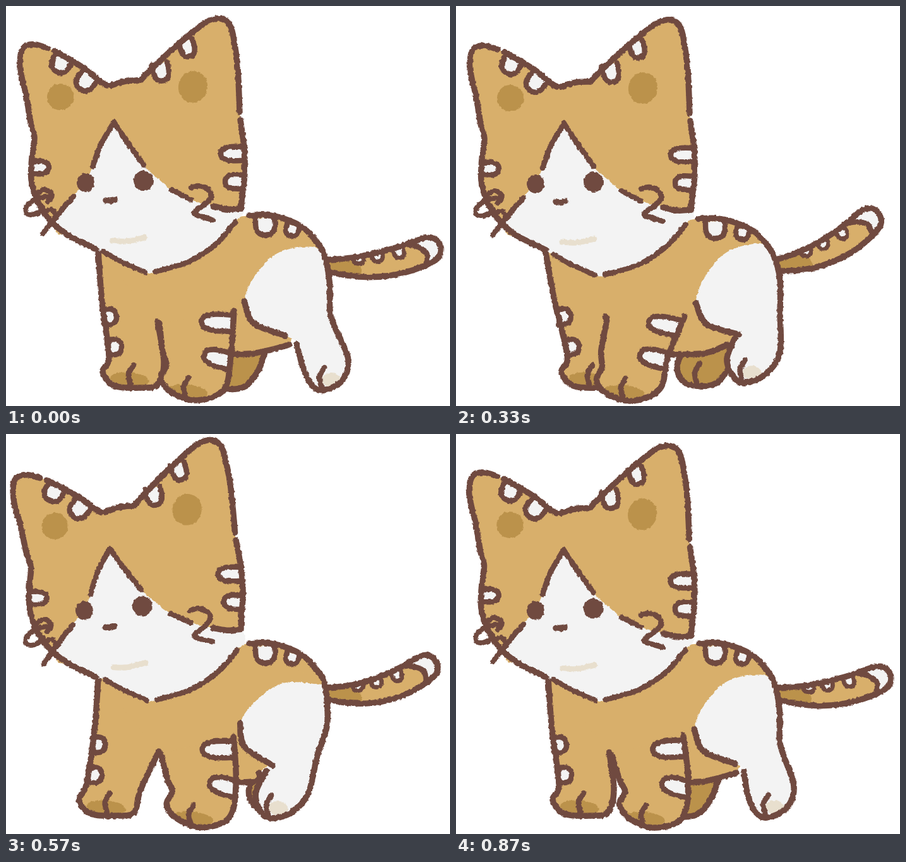
An HTML page with a canvas that plays this animation: 703 px wide and 634 px high, repeating every 0.9 s.

```html
<!DOCTYPE html>
<html lang="en">
<head>
<meta charset="utf-8">
<title>Walking cat</title>
<style>
  html, body { margin: 0; width: 100%; height: 100%; overflow: hidden; background: #fff; }
  canvas { display: block; width: 703px; height: 634px; filter: url(#rough); }
  svg { position: absolute; width: 0; height: 0; }
</style>
</head>
<body>
<canvas id="stage" width="703" height="634"></canvas>
<svg aria-hidden="true">
  <filter id="rough" x="0" y="0" width="100%" height="100%" color-interpolation-filters="sRGB">
    <feTurbulence type="fractalNoise" baseFrequency="0.2" numOctaves="2" seed="4"/>
    <feDisplacementMap in="SourceGraphic" scale="4" xChannelSelector="R" yChannelSelector="G"/>
  </filter>
</svg>
<script>
const ctx = document.getElementById('stage').getContext('2d');
const LINE = '#704a40', TAN = '#d8af6b', DARK = '#bb924b', WHITE = '#f3f3f3', PALE = '#e8dfce';
const LOOP = 900, STEP = 30, DEG = Math.PI / 180;

// Key values of the walk at these times; the rest follows from them
const TIMES = [0, 120, 210, 330, 480, 690, 870];
const WALK = {
  tilt:  [0, .033, .045, 0, -.047, -.035, -.004],
  nod:   [0, .6, 2.2, 2, -.2, -3.6, -.4],
  bob:   [0, 4, 6, 4.5, 2, -2, 0],
  nearX: [0, -36, -46, -22, -1, 18, 13],
  nearY: [0, -6, -9, 1, 0, -3, -1],
  leftX: [0, 16, 27, 14, -38, -23, 0],
  farX:  [-3, 3, 8, 30, 70, 43, 2],
  hindX: [3, 0, -12, -40, -80, -53, -6],
  hindY: [10, 0, -4, -1, 12, 9, 9],
  thigh: [.17, 0, 0, .1, .4, .27, .17]
};

// Smooth periodic curve through the key values
function ease(v, t) {
  const n = TIMES.length;
  const time = i => TIMES[(i + n) % n] + LOOP * Math.floor(i / n);
  const val = i => v[(i + n) % n];
  let i = n - 1;
  while (TIMES[i] > t) i--;
  const h = time(i + 1) - time(i), u = (t - time(i)) / h;
  const slope = k => (val(k + 1) - val(k - 1)) / (time(k + 1) - time(k - 1)) * h;
  return val(i) + (val(i + 1) - val(i)) * u * u * (3 - 2 * u)
    + slope(i) * u * (1 - u) ** 2 - slope(i + 1) * u * u * (1 - u);
}

function pts(...a) {
  const out = [];
  for (let i = 0; i < a.length; i += 2) out.push([a[i], a[i + 1]]);
  return out;
}
const clamp = v => Math.max(0, Math.min(1, v));
const mix = (a, b, w) => a + (b - a) * w;
const move = (p, x, y) => p.map(q => [q[0] + x, q[1] + y]);
const flip = p => p.slice().reverse();
function spin(p, [cx, cy], a) {
  const c = Math.cos(a), s = Math.sin(a);
  return p.map(([x, y]) => [cx + (x - cx) * c - (y - cy) * s, cy + (x - cx) * s + (y - cy) * c]);
}

// Bends a leg: its top turns about the hip, its paw shifts and rolls
function skin(p, { hip, paw, top, low }, x, y, swing, roll) {
  const upper = spin(p, hip, swing), lower = move(spin(p, paw, roll), x, y);
  return p.map((q, i) => {
    const w = clamp((q[1] - top) / (low - top)) ** 1.5;
    return [mix(upper[i][0], lower[i][0], w), mix(upper[i][1], lower[i][1], w)];
  });
}

function curve(p) {
  const at = i => p[Math.max(0, Math.min(p.length - 1, i))];
  ctx.beginPath();
  ctx.moveTo(...p[0]);
  for (let i = 0; i < p.length - 1; i++) {
    const [a, b, c, d] = [at(i - 1), at(i), at(i + 1), at(i + 2)];
    ctx.bezierCurveTo(b[0] + (c[0] - a[0]) / 6, b[1] + (c[1] - a[1]) / 6,
      c[0] - (d[0] - b[0]) / 6, c[1] - (d[1] - b[1]) / 6, c[0], c[1]);
  }
}
function fill(p, color) {
  curve(p);
  ctx.fillStyle = color;
  ctx.fill();
}
function stroke(p, width = 9.5, color = LINE) {
  curve(p);
  ctx.lineWidth = width;
  ctx.strokeStyle = color;
  ctx.stroke();
}
function oval([x, y], rx, ry, color, turn = 0) {
  ctx.beginPath();
  ctx.ellipse(x, y, rx, ry, turn, 0, 7);
  ctx.fillStyle = color;
  ctx.fill();
}
function shade(shape, [x, y], rx, ry, color) {
  ctx.save();
  curve(shape);
  ctx.clip();
  oval([x, y], rx, ry, color, .1);
  ctx.restore();
}
// White U-shaped stripe growing from a root point
function bar([x, y], angle, len, half, width = 8.5) {
  const u = [[0, -1], [.55, -1], [.9, -.65], [1, 0], [.9, .65], [.55, 1], [0, 1]];
  const p = spin(move(u.map(q => [q[0] * len, q[1] * half]), x, y), [x, y], angle * DEG);
  fill(p, WHITE);
  stroke(p, width);
}
const toe = ([x, y], dx) =>
  stroke([[x + dx, y - 36], [x + dx - 8, y - 21], [x + dx - 5, y - 6]], 8.5);

function drawTail(t) {
  const lag = deg => (.5 + .5 * Math.cos(t / LOOP * 2 * Math.PI - deg * DEG)) ** 1.5;
  const base = -16 * lag(115), tip = -18 * lag(140);
  const heading = u => 10 - 36 * u + base + 2 * (tip - base) * u;
  const half = u => 9 + 12 * Math.sin(2 * u);
  // point at u along the tail, side -1 (upper edge) to 1 (lower edge)
  const at = (u, side, reach = 0) => {
    let x = 508, y = 411;
    for (let i = 0; i < 20; i++) {
      const a = heading(u * (i + .5) / 20) * DEG;
      x += 165 * u / 20 * Math.cos(a);
      y += 165 * u / 20 * Math.sin(a);
    }
    const a = heading(u) * DEG, h = half(u);
    return [x + h * (reach * Math.cos(a) - side * Math.sin(a)), y + h * (reach * Math.sin(a) + side * Math.cos(a))];
  };
  const upper = [0, .2, .4, .6, .8, 1].map(u => at(u, -1)), lower = [1, .8, .6, .4, .2, 0].map(u => at(u, 1));
  const cap = [-45, 0, 45].map(d => at(1, Math.sin(d * DEG), Math.cos(d * DEG)));
  const edge = [...upper, ...cap, ...lower];
  const ring = [at(.82, -1), at(.92, -.5), at(.97, .2), at(.93, 1)];

  fill(edge, TAN);
  fill([at(0, -1), at(.27, -.9), at(.32, 0), at(.3, 1), at(0, 1)], DARK);
  fill([ring[0], at(1, -1), ...cap, at(1, 1), ...flip(ring)], WHITE);
  for (const u of [.31, .5, .72]) bar(at(u, -1), heading(u) + 90, 6 + 16 * u, 8, 7);
  stroke(ring, 8.5);
  stroke(edge);
}

const NEAR = { hip: [302, 493], paw: [300, 600], top: 483, low: 575 };
const LEFT = { hip: [195, 440], paw: [200, 590], top: 390, low: 560 };
const HIND = { hip: [418, 431], paw: [505, 570], top: 440, low: 565 };

function drawBody(t, w) {
  const lift = p => p.map(([x, y]) => [x, y + 1.2 * w.bob * clamp((540 - x) / 60)]);
  const back = lift(pts(384,332, 410,331, 440,337, 470,351, 492,374, 505,397));
  const bendNear = p => skin(p, NEAR, w.nearX, w.nearY, -w.nearX / 140, w.nearX * .003);
  const bendLeft = p => skin(p, LEFT, w.leftX, 0, 0, 0);

  const far = move(pts(330,550, 320,575, 328,598, 352,607, 382,602, 402,578, 414,546), w.farX, -.15 * w.farX);
  const near = bendNear(pts(243,503, 248,548, 254,569, 245,590, 262,612, 302,625, 345,608, 356,555, 361,483));
  const left = bendLeft(pts(152,470, 163,555, 153,580, 172,602, 213,605, 240,600, 250,565));
  left.unshift([146 - w.bob, 388]);
  left.push([near[0][0] - 3, near[0][1] - 3]);
  const thigh = spin(pts(476,371, 425,389, 395,430, 384,474, 404,506, 457,517), HIND.hip, w.thigh);
  const foot = skin(pts(466,527, 468,565, 482,592, 500,599, 530,583, 544,545, 522,477, 513,425),
    HIND, w.hindX, w.hindY, w.thigh, -.003 * w.hindX);

  fill(far, DARK);
  stroke(far);
  toe(far[3], 4);

  const belly = [[335, 553], [395, 550], [foot[0][0] - 12, 537]];
  ctx.beginPath();
  for (const p of [left[0], [250, 350], ...back, [480, 470], ...flip(belly), near[0], left[8], left[1]]) ctx.lineTo(...p);
  ctx.fillStyle = TAN;
  ctx.fill();
  fill(back, TAN);
  stroke(belly);

  fill(left, TAN);
  shade(left, [left[5][0] - 17, left[5][1] - 13], 31, 11, DARK);
  for (const p of bendLeft(pts(155,493, 163,541))) bar(p, -3, 20, 12);
  toe(left[5], -11);
  stroke(left);

  const hind = [back[5], ...thigh, ...foot];
  fill(hind, WHITE);
  shade(hind, [foot[3][0] + 12, foot[3][1] - 16], 15, 11, PALE);
  toe(foot[3], 1);
  stroke(thigh.slice(3));
  const [spotA, spotB] = lift(pts(410,336, 455,348));
  bar(spotA, 87, 27, 15);
  bar(spotB, 105, 17, 10);
  stroke([...back, ...flip(foot)]);

  fill(near, TAN);
  shade(near, [near[5][0] - 15, near[5][1] - 14], 32, 11, DARK);
  const [barA, barB] = bendNear(pts(358,503, 356,564));
  bar(barA, 183 - .4 * w.nearX, 49, 13);
  bar(barB, 195, 44, 13);
  toe(near[5], -13);
  stroke(near);
}

function drawHead(w) {
  const tip = p => p.map(([x, y]) => [x - w.tilt * (y - 325), y + w.tilt * (x - 165) + w.nod]);
  const line = (...a) => tip(pts(...a));
  const hang = p => move(p, -60 * w.tilt, w.bob);

  const cheek = line(66,67, 46,61, 30,64, 23,78, 24,108, 32,142, 39,185, 45,208, 41,240, 40,275, 48,305, 61,328, 75,345, 98,363);
  const crown = line(77,71, 105,87, 130,103, 150,120, 160,126);
  const brow = line(166,126, 190,119, 213,118);
  const ear = line(213,118, 225,105, 260,72, 300,38, 320,24, 340,20, 355,31, 362,60, 367,100, 370,168);
  const side = line(371,180, 377,225, 378,265, 374,300, 372,321);
  const jaw = line(328,317, 350,322, 372,321);
  const right = line(171,184, 171,184, 190,213, 218,252, 240,273, 262,291, 293,307);
  const leftMask = line(75,345, 106,302, 125,280, 137,255, 150,220, 171,184, 171,184);
  const neck = hang(pts(376,329, 363,342, 335,375, 290,405, 228,424, 186,407, 150,388));
  const chin = [[142, 385 + w.bob / 3]];

  fill([...cheek, ...line(230,340), ...jaw, ...flip([...crown, ...brow, ...ear, ...side])], TAN);
  fill([...right, ...jaw, ...neck, ...chin, ...cheek.slice(-1), ...leftMask], WHITE);

  const [spotA, spotB, eyeA, eyeB] = line(86,144, 296,128, 126,280, 218,277);
  oval(spotA, 21, 21, DARK);
  oval(spotB, 23, 25, DARK, .3);

  const stripe = (x, y, ...rest) => bar(line(x, y)[0], ...rest);
  stripe(92, 82, 119, 25, 14);
  stripe(133, 111, 130, 26, 14);
  stripe(243, 91, 78, 28, 12);
  stripe(284, 55, 74, 26, 11);
  stripe(42, 256, 0, 26, 10);
  stripe(376, 234, 180, 36, 11);
  stripe(375, 279, 183, 28, 11);

  for (const p of [crown, brow, ear, side, jaw, [...cheek, ...chin]]) stroke(p);
  stroke(hang(pts(154,389, 180,404, 220,422)), 8);
  stroke(hang(pts(236,421, 290,405, 335,375, 363,342)), 8.5);

  for (const p of [right.slice(1, 4), right.slice(5), flip(leftMask.slice(3, 6))]) stroke(p, 8.5);
  stroke(line(107,302, 84,328, 58,361), 8.5);
  stroke(line(293,288, 306,285, 320,291, 325,302, 315,314, 300,325, 301,331, 327,339), 8.5);
  stroke(line(49,298, 60,291, 71,296, 72,304, 66,310), 8);
  stroke(line(69,302, 50,305, 34,316, 31,326, 39,331, 52,327, 58,319), 8);
  stroke(line(62,326, 72,323, 78,331, 75,341, 66,350), 8);

  oval(eyeA, 14, 15, LINE);
  oval(eyeB, 16, 16, LINE);
  stroke(line(158,308, 165,309, 173,307));
  stroke(line(168,372, 190,373, 219,367), 9, PALE);
}

function draw(ms) {
  const t = Math.floor(ms % LOOP / STEP) * STEP, w = {};
  for (const k in WALK) w[k] = ease(WALK[k], t);
  ctx.clearRect(0, 0, 703, 634);
  ctx.lineCap = ctx.lineJoin = 'round';
  drawTail(t);
  drawBody(t, w);
  drawHead(w);
}

const start = performance.now();
function tick() {
  draw(performance.now() - start);
  requestAnimationFrame(tick);
}
tick();
</script>
</body>
</html>
```
